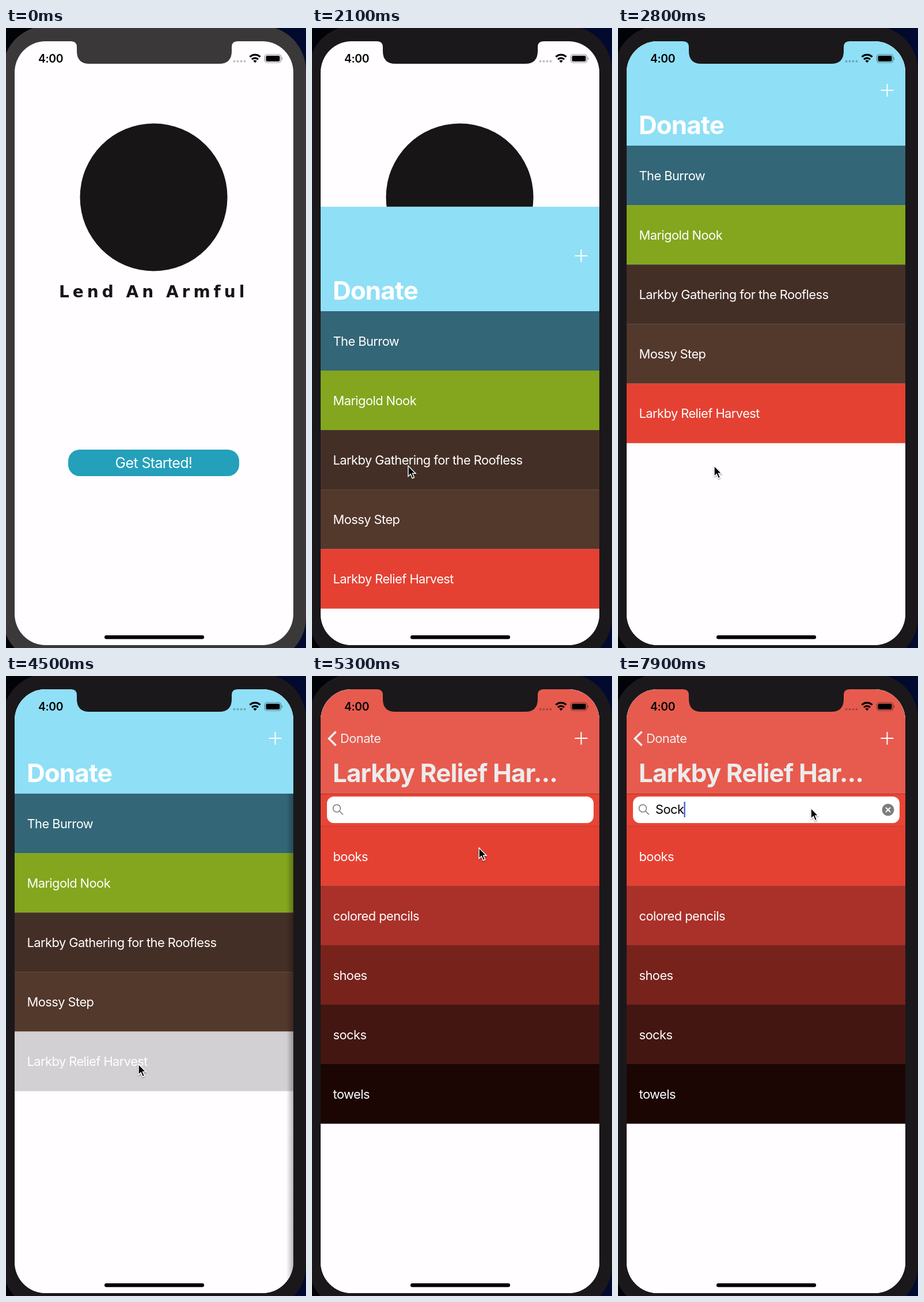
These frames come from a looping animation (521 px wide and 1075 px high, 8000 ms). An HTML page:

```html
<!DOCTYPE html>
<html lang="en">
<head>
<meta charset="utf-8">
<style>
  html, body { margin: 0; width: 100%; height: 100%; overflow: hidden; background: #000; }
  svg { display: block; width: 521px; height: 1075px; }
  text { font: 21.9px Inter, Roboto, sans-serif; letter-spacing: -.026em; fill: #fff; white-space: pre; }
  .large { font-size: 43.9px; font-weight: 700; letter-spacing: -.02em; }
  .line { fill: none; stroke: #fff; stroke-width: 2; }
</style>
</head>
<body>
<svg viewBox="0 0 521 1075">
  <defs>
    <linearGradient id="desk"><stop offset=".5" stop-color="#020309"/><stop offset="1" stop-color="#020a30"/></linearGradient>
    <linearGradient id="edge"><stop offset="0" stop-opacity="0"/><stop offset="1" stop-opacity=".28"/></linearGradient>
    <clipPath id="screen"><rect x="15" y="23" width="484" height="1047" rx="54"/></clipPath>
    <filter id="soft" x="-50%" y="-50%" width="200%" height="200%">
      <feDropShadow dx="0" dy="1.5" stdDeviation="1.2" flood-opacity=".4"/>
    </filter>
  </defs>

  <rect width="521" height="1075" fill="url(#desk)"/>
  <rect class="bezel" x="-6" y="-4" width="527" height="1104" rx="78"/>

  <g clip-path="url(#screen)">
    <rect width="521" height="1075" fill="#fffdff"/>
    <circle cx="256.5" cy="293.5" r="128" fill="#171516"/>
    <text x="92" y="467" style="font:700 28px 'DejaVu Sans',sans-serif;letter-spacing:6px;fill:#171516">Lend An Armful</text>
    <rect x="108" y="731" width="297" height="46" rx="20" fill="#24a0ba"/>
    <text x="256.5" y="763" text-anchor="middle" style="font-size:25px">Get Started!</text>

    <g id="sheet">
      <rect y="23" width="521" height="1052" fill="#fffdff"/>
      <g id="places"></g>
      <rect id="dim" y="204" width="521" height="871" opacity="0"/>
      <g id="detail">
        <rect x="3" y="204" width="12" height="871" fill="url(#edge)"/>
        <rect x="15" y="204" width="484" height="871" fill="#fffdff"/>
        <rect x="15" y="204" width="484" height="57" fill="#e84536"/>
        <path d="M15 204.5h484M15 260.5h484" stroke="#a5352b"/>
        <rect x="26" y="209" width="463" height="46" rx="12" fill="#fff"/>
        <g fill="none" stroke="#85858a" stroke-width="1.7"><circle cx="43" cy="229.5" r="6.4"/><path d="M47.6 234.1l6.4 6.4"/></g>
        <text id="query" x="65" y="239" style="fill:#000"></text>
        <rect id="caret" y="218" width="2.4" height="27" fill="#4069cf"/>
        <g id="clear">
          <circle cx="469" cy="232" r="10.5" fill="#7d7d80"/>
          <path class="line" d="M465 228l8 8m0-8l-8 8"/>
        </g>
        <g id="items"></g>
      </g>

      <rect y="23" width="521" height="181" fill="#8fdff6"/>
      <rect id="redBar" y="23" width="521" height="181" fill="#e75b4e"/>
      <text id="oldTitle" class="large" x="36" y="184">Donate</text>
      <text id="newTitle" class="large" x="36" y="184" style="fill:#ececec">Larkby Relief Har...</text>
      <g id="back">
        <path class="line" d="M41.5 96.5L29.5 108.5l12 12" style="stroke:#f1eeee;stroke-width:3.6"/>
        <text x="49" y="116" style="fill:#f1eeee">Donate</text>
      </g>
      <path class="line" d="M456.5 108h22m-11-11v22"/>
    </g>
  </g>

  <path class="bezel" d="M113 20V23Q123 23 123 33V40Q123 62 145 62H370Q392 62 392 40V33Q392 23 402 23V20Z"/>

  <text x="56" y="60" style="font-size:19.4px;font-weight:600;letter-spacing:-.02em;fill:#000">4:00</text>
  <path d="M396.5 57.8h19" stroke="#000" stroke-opacity=".25" stroke-width="4" stroke-dasharray="0 6" stroke-linecap="round"/>
  <g fill="none" stroke="#000" stroke-width="3.2">
    <path d="M423.5 50.2a12.5 12.5 0 0 1 18 0M427 54.3a8 8 0 0 1 11 0"/>
    <path d="M432.5 60.2l-3.2-3.2a4.6 4.6 0 0 1 6.4 0z" fill="#000" stroke="none"/>
  </g>
  <rect x="449.5" y="46" width="28" height="14" rx="4" fill="none" stroke="#000" stroke-opacity=".45" stroke-width="1.2"/>
  <rect x="451.5" y="48" width="24" height="10" rx="2.2"/>
  <path d="M479 50.5q2.5 2.5 0 5z" opacity=".5"/>
  <rect x="171" y="1053" width="173" height="6.5" rx="3.25"/>

  <path id="cursor" filter="url(#soft)" stroke="#fff" stroke-width="1.4" d="M0 0V18.5L4.3 14.5 7.3 21.7 10.5 20.3 7.5 13.3H13Z"/>
</svg>

<script>
const LOOP = 8000, STEP = 100, ROW = 103.1;
const $ = id => document.getElementById(id);
const clamp = v => Math.min(1, Math.max(0, v));
const move = (id, x, y = 0) => $(id).setAttribute('transform', `translate(${x} ${y})`);
const fade = (id, v) => $(id).setAttribute('opacity', v);

function fillRows(id, top, rows) {
  $(id).innerHTML = rows.map(([label, color], i) => {
    const y = top + i * ROW;
    return `<rect x="15" y="${y}" width="484" height="${ROW + .3}" fill="${color}"/>
            <text x="36.5" y="${y + 60}">${label}</text>`;
  }).join('');
}
fillRows('places', 204, [
  ['The Burrow', '#336677'],
  ['Marigold Nook', '#83a61e'],
  ['Larkby Gathering for the Roofless', '#442f27'],
  ['Mossy Step', '#53382c'],
  ['Larkby Relief Harvest', '#e44133']
]);
fillRows('items', 260.5, [
  ['books', '#e44133'],
  ['colored pencils', '#a93129'],
  ['shoes', '#77231c'],
  ['socks', '#431611'],
  ['towels', '#1b0604']
]);
const pickedRow = $('places').querySelector('rect:last-of-type');

// Critically damped settle: 0 at the start, approaching 1.
function settle(ms) {
  const x = Math.max(0, ms) / 1000 * 12.83;
  return 1 - (1 + x) * Math.exp(-x);
}

// Pointer path: time, x, y
const pointerPath = [
  [100, 530, 1060], [700, 175, 772], [1000, 175, 772], [1100, 167, 759],
  [3400, 167, 759], [4100, 230, 673], [4800, 230, 673],
  [5300, 290, 298], [5800, 335, 229], [LOOP, 335, 229]
];
function pointerAt(t) {
  const i = Math.max(1, pointerPath.findIndex(p => p[0] >= t));
  const [t0, x0, y0] = pointerPath[i - 1], [t1, x1, y1] = pointerPath[i];
  const u = clamp((t - t0) / (t1 - t0)), k = u * u * (3 - 2 * u);
  return [x0 + (x1 - x0) * k, y0 + (y1 - y0) * k];
}

const keyTimes = [6700, 7000, 7300, 7500];

function draw(t) {
  const bezel = t < 1600 ? '#3a3839' : '#1a181b';
  document.querySelectorAll('.bezel').forEach(e => e.setAttribute('fill', bezel));
  move('cursor', ...pointerAt(t));

  const rise = t < 2600 ? settle(t - 1900) : 1;
  move('sheet', 0, 1047 * (1 - rise));

  const push = t < 5200 ? settle(t - 4500) : 1;
  pickedRow.setAttribute('fill', t >= 4400 ? '#d2d0d3' : '#e44133');
  move('places', -145 * push);
  fade('dim', .1 * push);
  move('detail', 484 * (1 - push));
  $('detail').style.display = t < 4500 ? 'none' : '';
  fade('redBar', push);
  fade('oldTitle', clamp(1 - 2 * push));
  move('oldTitle', -145 * push);
  move('newTitle', 484 * (1 - push));
  fade('back', clamp(2 * push - 1));

  const typed = 'Sock'.slice(0, keyTimes.filter(k => t >= k).length);
  if ($('query').textContent !== typed) $('query').textContent = typed;
  const end = typed ? $('query').getComputedTextLength() : 0;
  $('caret').setAttribute('x', 65 + end);
  fade('caret', typed || (t >= 6100 && (t - 6100) % 1000 < 500) ? 1 : 0);
  fade('clear', typed ? 1 : 0);
}

function tick() {
  draw(Math.floor(performance.now() % LOOP / STEP) * STEP);
  requestAnimationFrame(tick);
}
tick();
</script>
</body>
</html>
```
